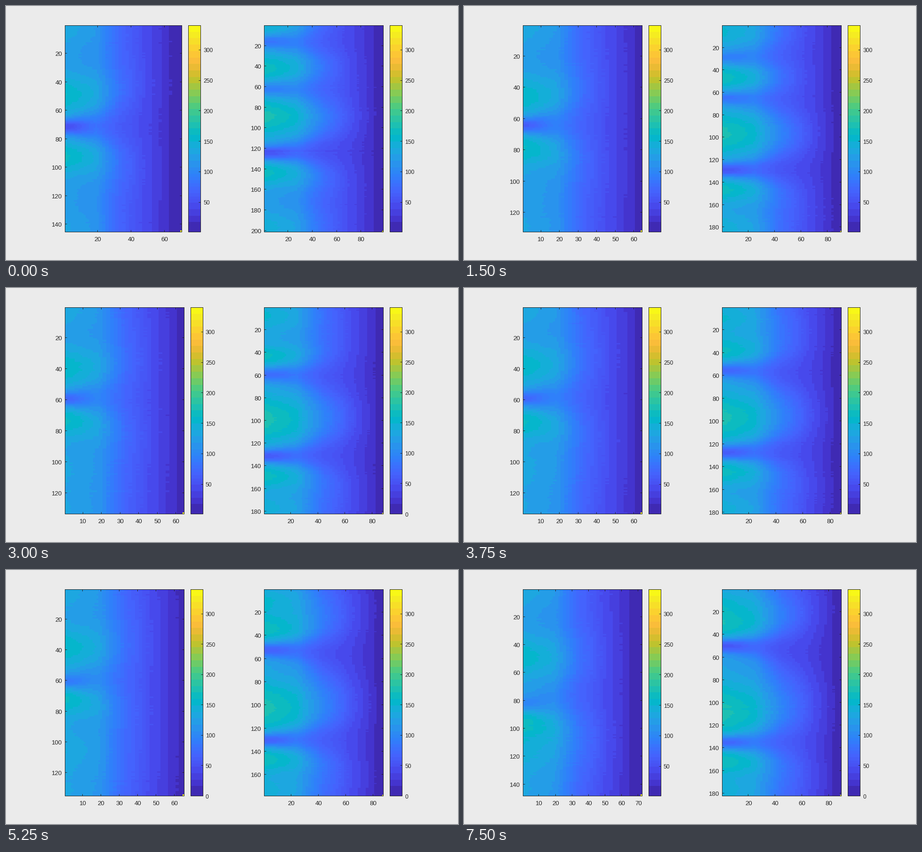
A matplotlib script that plays this animation: 960 by 540 pixels, repeating every 8000 ms.

```python
import numpy as np
import matplotlib.pyplot as plt
from matplotlib.animation import FuncAnimation
from matplotlib.colors import LinearSegmentedColormap

W, H, DPI = 960, 540, 96
TOP, BOTTOM = 41.5, 480.5
SPAN = BOTTOM - TOP
VMAX = 340
INK = "#262626"
plt.rcParams["font.family"] = "Liberation Sans"

STOPS = {0: "#3e26a8", 4: "#4537d5", 8: "#484df0", 12: "#4563fd", 15: "#3875fe",
         17: "#2f81fa", 20: "#2b91ef", 24: "#20a5e3", 27: "#12b1d6", 29: "#01b8ca",
         32: "#19bfb6", 35: "#31c69f", 38: "#4acb84", 42: "#81cc59", 47: "#c5c22a",
         51: "#f0ba36", 53: "#febe3c", 56: "#fccf30", 60: "#f5e924", 63: "#f9fb15"}


def make_palette():
    """64 colours, neighbours merged into bands outside the mid blues."""
    ramp = LinearSegmentedColormap.from_list(
        "ramp", [(k / 63, c) for k, c in STOPS.items()], N=1024)
    edges = [0, 3, 5, 7] + list(range(9, 20)) + list(range(20, 65, 2))
    bands = [np.tile(ramp((a + b - 1) / 126)[:3], (b - a, 1))
             for a, b in zip(edges, edges[1:])]
    return np.vstack(bands)


PALETTE = make_palette()

# Key steps; everything between them is interpolated.
KEYS = [0, 1, 3, 5, 7, 9, 10]
SIZE = {"L": ([145, 131, 133, 133, 135, 136, 148], [70, 63, 64, 64, 65, 66, 72]),
        "R": ([201, 185, 182, 181, 178, 179, 182], [98, 90, 89, 88, 87, 87, 89])}
FROM_ZERO = {"L": (1, 7), "R": (3, 4, 6, 7, 9, 10)}


def track(step, values):
    return np.interp(step, KEYS, values)


def size(side, step):
    return [int(round(track(step, v))) for v in SIZE[side]]


def left_bumps(step):
    """Bumps at the left border: centre y, height, width."""
    gap = track(step, [257, 270, 238, 236, 238, 256, 286])
    above = track(step, [190, 210, 175, 165, 165, 208, 185])
    below = track(step, [322, 330, 278, 287, 275, 335, 322])
    return [(gap, -78 + 4.2 * step, 12), (above, 37, 30), (below, 40, 25),
            (45, 14, 25), (385, 2.3 * step, 35), (475, 8, 25)]


def right_bumps(step):
    fading = track(step, [75, 98, 124, 122, 118, 118, 118])
    upper = track(step, [177, 200, 193, 175, 170, 157, 162])
    lower = track(step, [313, 333, 366, 350, 362, 358, 367])
    room = lower - upper
    crest = upper + room * min(.43 + .03 * step, .68)
    return [(fading, min(0, -55 + 10 * step), 11),
            (upper, -42 - 3 * step, 11), (lower, -75, 11),
            (52 + 2 * step, 30, 22), (upper - 44, 45, 22),
            (crest, 53, .23 * room), (lower + 42, 43, 20), (470, 24, 22)]


def fade(u):
    """Plain falloff from the left border to the right one."""
    return np.interp(u, [0, .28, .38, .51, .67, .77, .86, .95, 1],
                     [122, 108, 86, 64, 48, 37, 26, 16, 8])


def colours(values, low):
    k = np.floor((values - low) / (VMAX - low) * 64).astype(int)
    return PALETTE[np.clip(k, 0, 63)]


def field(side, step):
    """Bumps that widen and weaken as they spread to the right."""
    rows, cols = size(side, step)
    rng = np.random.default_rng(step * 2 + (side == "R"))
    y = (TOP + (np.arange(rows) + .5) * SPAN / rows)[:, None]
    c = np.arange(cols)
    c = np.where(c > .3 * cols, c // 2 * 2 + .5, c)
    u = (c + .5) / cols

    if side == "L":
        bumps, spread, reach = left_bumps(step), 80, (63 / cols) ** .6
    else:
        bumps, spread, reach = right_bumps(step), 48, .96
    v = np.tile(fade(u / reach), (rows, 1))
    for cy, height, width in bumps:
        s = np.hypot(width, spread * u)
        v += height * width / s * (1 - u * u) * np.exp(-.5 * ((y - cy) / s) ** 2)

    jitter = rng.normal(0, .7, rows) + (rng.random(rows) < .07) * rng.normal(0, 2, rows)
    v += jitter[:, None] * (1 - .6 * u)
    v[-1, -1] = VMAX
    return colours(v, low_end(side, step))


def low_end(side, step):
    return 0 if step in FROM_ZERO[side] else 1


fig = plt.figure(figsize=(W / DPI, H / DPI), dpi=DPI, facecolor="#ebebeb")
ax = fig.add_axes([0, 0, 1, 1])
IMAGES = {(side, k): field(side, k) for side in "LR" for k in range(11)}


def picture(img, x0, x1):
    ax.imshow(img, extent=(x0, x1, BOTTOM, TOP), aspect="auto",
              interpolation="nearest")


def line(xs, ys):
    ax.plot(xs, ys, color=INK, lw=.75, snap=False,
            solid_capstyle="butt", solid_joinstyle="miter")


def box(x0, x1):
    line([x0, x1, x1, x0, x0, x1], [TOP, TOP, BOTTOM, BOTTOM, TOP, TOP])


def label(x, y, n, ha, pt=10):
    ax.text(x, y, str(n), ha=ha, va="baseline", size=pt, color=INK)


def centre(v):
    return np.floor(v) + .5


def panel(side, step, x0, x1, xstep):
    rows, cols = size(side, step)
    picture(IMAGES[side, step], x0, x1)
    box(x0, x1)
    for n in range(xstep, cols + 1, xstep):
        x = x0 + (n - .5) * (x1 - x0) / cols
        line([centre(x)] * 2, [TOP, TOP + 4])
        line([centre(x)] * 2, [BOTTOM - 4, BOTTOM])
        label(x + .5, 500, n, "center")
    for n in range(20, rows + 1, 20):
        y = TOP + (n - .5) * SPAN / rows
        line([x0, x0 + 4], [centre(y)] * 2)
        line([x1 - 4, x1], [centre(y)] * 2)
        label(x0 - 6, y + 5.5, n, "right")

    b0, b1, low = x1 + 14, x1 + 40, low_end(side, step)
    picture(PALETTE[::-1, None], b0, b1)
    box(b0, b1)
    for n in range(50 * low, VMAX, 50):
        y = BOTTOM - (n - low) * SPAN / (VMAX - low)
        line([b1 - 4, b1], [centre(y)] * 2)
        label(b1 + 5.5, y + 5, n, "left", 9)


def draw(i):
    step = i // 3
    ax.clear()
    if step == 0:
        panel("L", step, 125.5, 373.5, 20)
    else:
        panel("L", step, 125.5, 378.5, 10)
    panel("R", step, 548.5, 801.5, 20)
    ax.set_xlim(0, W)
    ax.set_ylim(H, 0)
    ax.axis("off")
    return []


anim = FuncAnimation(fig, draw, frames=32, interval=250, repeat=True,
                     repeat_delay=0, blit=False)
plt.show()
```
